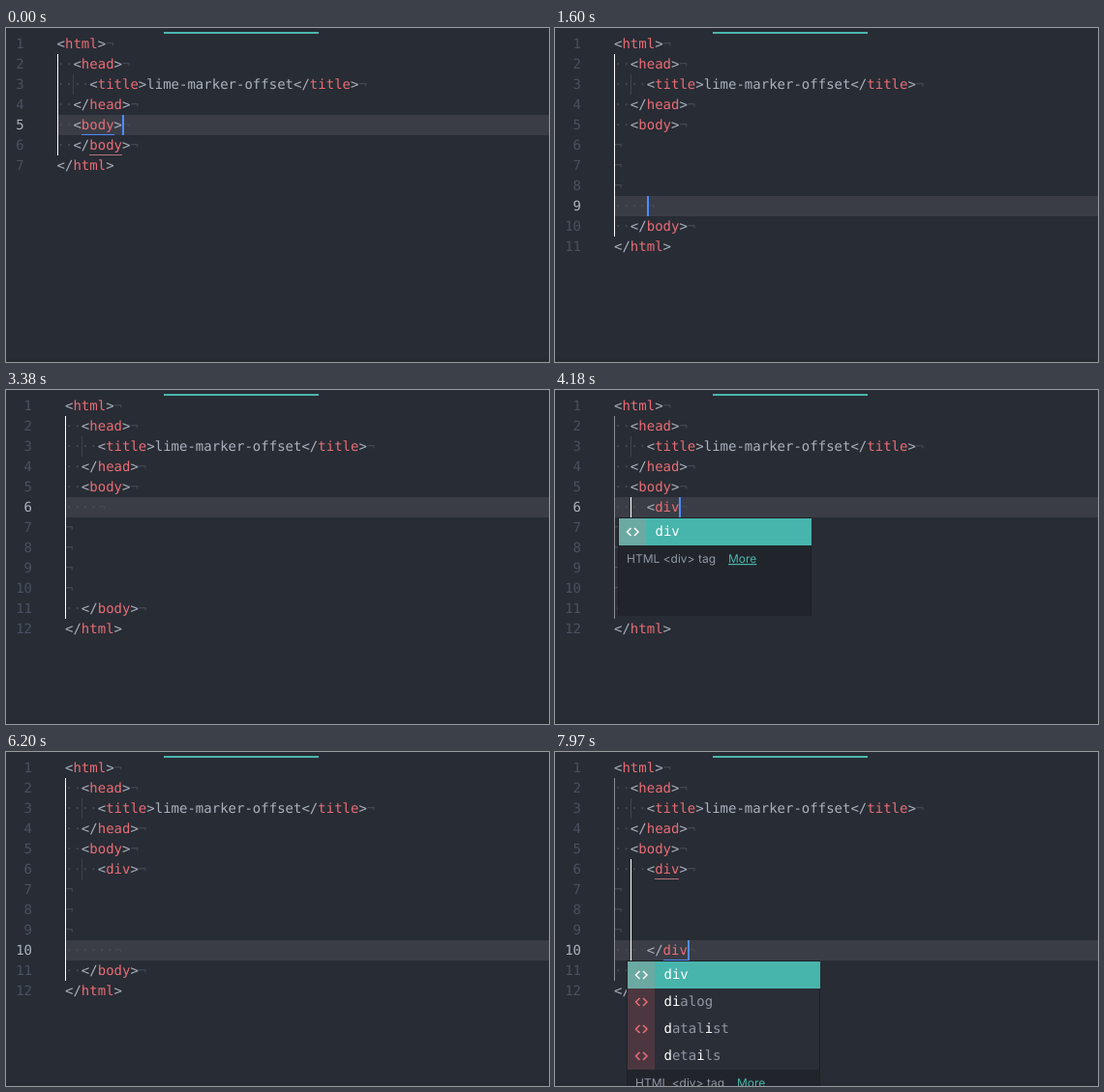
Animation, 561 px wide and 346 px high, one loop 8000 ms. Source, as an HTML page:

```html
<!DOCTYPE html>
<html lang="en">
<head>
<meta charset="utf-8">
<title>Editor</title>
<style>
  html, body { margin: 0; width: 100%; height: 100%; overflow: hidden; background: #282c34; }
  svg { display: block; }
  text {
    font: 14px "DejaVu Sans Mono", "Liberation Mono", monospace;
    white-space: pre;
    text-rendering: geometricPrecision;
  }
  .foot { font: 12px Inter, "Liberation Sans", sans-serif; }
</style>
</head>
<body>
<svg id="stage" width="561" height="346" viewBox="0 0 561 346"></svg>
<script>
const LOOP = 8000;
const CHAR = 14 * 0.60205;
const ROW = 21, TOP = 6, ITEM = 28, FOOT = 73, MENU_W = 199;
const C = {
  text: '#abb2bf', tag: '#e96d76', faint: '#454a54', number: '#495162',
  active: '#3a3d45', caret: '#528bff', teal: '#47b5ac',
  guide: '#ffffff', outer: '#8b8e94', dim: '#3e434c'
};

const MENUS = {
  d: ['dd', 'dl', 'dt', 'del', 'dfn', 'div', 'data', 'dialog', 'details', 'datalist'],
  di: ['div', 'dialog', 'datalist', 'details'],
  div: ['div']
};

// Each step changes part of the editor state; `edits` are typed lines by row.
const STEPS = [
  [0, { blanks: 0, row: 5, pad: 4, open: '', close: '', caret: true, menu: '', match: true }],
  [170, { caret: false }],
  [530, { caret: true }],
  [940, { caret: false }],
  [1120, { blanks: 1, row: 6, caret: true, match: false }],
  [1270, { blanks: 2, row: 7 }],
  [1420, { blanks: 3, row: 8 }],
  [1580, { blanks: 4, row: 9 }],
  [1740, { blanks: 5, row: 10 }],
  [2190, { caret: false }],
  [2360, { row: 9, caret: true }],
  [2540, { row: 8 }],
  [2720, { row: 7 }],
  [2900, { row: 6 }],
  [3380, { caret: false }],
  [3560, { open: '<', caret: true }],
  [3920, { open: '<d' }],
  [3970, { menu: 'd' }],
  [4090, { open: '<di' }],
  [4180, { open: '<div', menu: 'div' }],
  [4360, { open: '<div>', menu: '' }],
  [4840, { caret: false }],
  [5200, { row: 7, pad: 6, caret: true }],
  [5370, { row: 8 }],
  [5550, { row: 9 }],
  [5660, { row: 10 }],
  [6200, { caret: false }],
  [6250, { pad: 4, caret: true }],
  [6730, { close: '<' }],
  [6910, { close: '</' }],
  [7080, { close: '</d' }],
  [7200, { menu: 'd' }],
  [7560, { close: '</di' }],
  [7610, { menu: 'di' }],
  [7970, { close: '</div', match: true }]
];

const escape = s => s.replace(/&/g, '&amp;').replace(/</g, '&lt;').replace(/>/g, '&gt;');
const rect = (x, y, w, h, fill) =>
  `<rect x="${x}" y="${y}" width="${w}" height="${h}" fill="${fill}"/>`;
const text = (x, y, s, fill, extra = '') =>
  `<text x="${x.toFixed(2)}" y="${y}" fill="${fill}" ${extra}>${escape(s)}</text>`;
const rowTop = row => TOP + ROW * (row - 1);

function documentLines(s) {
  const lines = ['<html>', '  <head>', '    <title>lime-marker-offset</title>', '  </head>', '  <body>'];
  for (let row = 6; row < 6 + s.blanks; row++) {
    const typed = row === 6 ? s.open : row === 10 ? s.close : '';
    lines.push(typed ? '    ' + typed : row === s.row ? ' '.repeat(s.pad) : '');
  }
  return lines.concat('  </body>', '</html>');
}

function codeLine(line, left, y, last) {
  const indent = line.length - line.trimStart().length;
  let out = indent ? text(left, y, '·'.repeat(indent), C.faint) : '';
  let col = indent, inTag = false;
  for (const part of line.slice(indent).match(/<\/?|>|[^<>]+/g) || []) {
    const bracket = /[<>]/.test(part);
    out += text(left + col * CHAR, y, part, !bracket && inTag ? C.tag : C.text);
    if (bracket) inTag = part !== '>';
    col += part.length;
  }
  return last ? out : out + text(left + col * CHAR, y, '¬', C.faint);
}

function guides(s, lines, left) {
  const x0 = Math.round(left), x1 = Math.round(left + 2 * CHAR);
  const inner = s.row > 5 && lines[s.row - 1].trim() !== '';
  const line = (x, from, to, fill) => rect(x, rowTop(from), 1, (to - from + 1) * ROW, fill);
  let out = line(x0, 2, lines.length - 1, inner ? C.outer : C.guide) + line(x1, 3, 3, C.dim);
  if (inner) out += line(x1, 6, s.row, C.guide);
  else if (s.open) out += line(x1, 6, 6, C.dim);
  return out;
}

function tagUnderlines(s, left) {
  const mark = (row, col, length, fill) =>
    rect(Math.round(left + col * CHAR), rowTop(row) + ROW - 1, Math.round(length * CHAR), 1, fill);
  const other = '#b5737d';
  return s.row === 5
    ? mark(5, 3, 4, C.caret) + mark(6, 4, 4, other)
    : mark(6, 5, 3, other) + mark(10, 6, 3, C.caret);
}

// Prefix letters found in order are shown bold.
function menuLabel(word, prefix, x, y, selected) {
  let hit = 0;
  return [...word].map((ch, i) => {
    const bold = ch === prefix[hit];
    if (bold) hit++;
    return text(x + i * CHAR, y, ch, bold || selected ? '#ffffff' : '#9097a4',
      bold ? 'font-weight="700"' : '');
  }).join('');
}

function menu(s, left) {
  const startCol = s.row === 6 ? 5 : 6;
  const x = Math.round(left + startCol * CHAR - 37), y = rowTop(s.row + 1) + 1;
  const words = MENUS[s.menu], listH = words.length * ITEM;
  let out = rect(x - 1, y - 1, MENU_W + 1, listH + FOOT + 1, '#1d2026')
    + rect(x, y, MENU_W - 1, listH, '#2a2e37');
  words.forEach((word, i) => {
    const top = y + i * ITEM, mid = top + 14, selected = i === 0;
    if (selected) out += rect(x, top, MENU_W, ITEM, C.teal);
    out += rect(x, top, ITEM, ITEM, selected ? '#6ba9a3' : '#4c3740')
      + `<path d="M${x + 12.5} ${mid - 4}l-4 4l4 4m3.5 -8l4 4l-4 4" fill="none" stroke-width="1.5" stroke="${selected ? '#fff' : C.tag}"/>`
      + menuLabel(word, s.menu, x + 37.5, top + 18, selected);
  });
  const footY = y + listH;
  return out + rect(x, footY, MENU_W - 1, FOOT, '#21252b')
    + text(x + 8, footY + 18, `HTML <${words[0]}> tag`, '#9097a4', 'class="foot"')
    + text(x + 113, footY + 18, 'More', C.teal, 'class="foot" text-decoration="underline"');
}

function picture(s) {
  const lines = documentLines(s);
  const left = 61 - (lines.length < 10 ? CHAR : 0);
  const hi = Math.round(left);
  let out = rect(0, 0, 561, 346, '#282c34')
    + rect(0, 342, 561, 4, '#262a31')
    + rect(163, 4, 160, 2, '#4db6ae')
    + rect(hi, rowTop(s.row), 561 - hi, ROW, C.active);
  lines.forEach((line, i) => {
    const row = i + 1, y = rowTop(row) + 15;
    out += text(left - 34, y, String(row), row === s.row ? C.text : C.number, 'text-anchor="end"')
      + codeLine(line, left, y, row === lines.length);
  });
  out += guides(s, lines, left);
  if (s.match) out += tagUnderlines(s, left);
  if (s.caret) {
    const x = Math.round(left + lines[s.row - 1].length * CHAR);
    out += rect(x, rowTop(s.row), 2, ROW, C.caret);
  }
  return s.menu ? out + menu(s, left) : out;
}

const stage = document.getElementById('stage');
const start = performance.now();
let shown = -1;

function update(now) {
  const t = Math.max(0, now - start) % LOOP;
  const count = STEPS.filter(([at]) => at <= t).length;
  if (count !== shown) {
    shown = count;
    stage.innerHTML = picture(Object.assign({}, ...STEPS.slice(0, count).map(step => step[1])));
  }
  requestAnimationFrame(update);
}
update(start);
</script>
</body>
</html>
```
